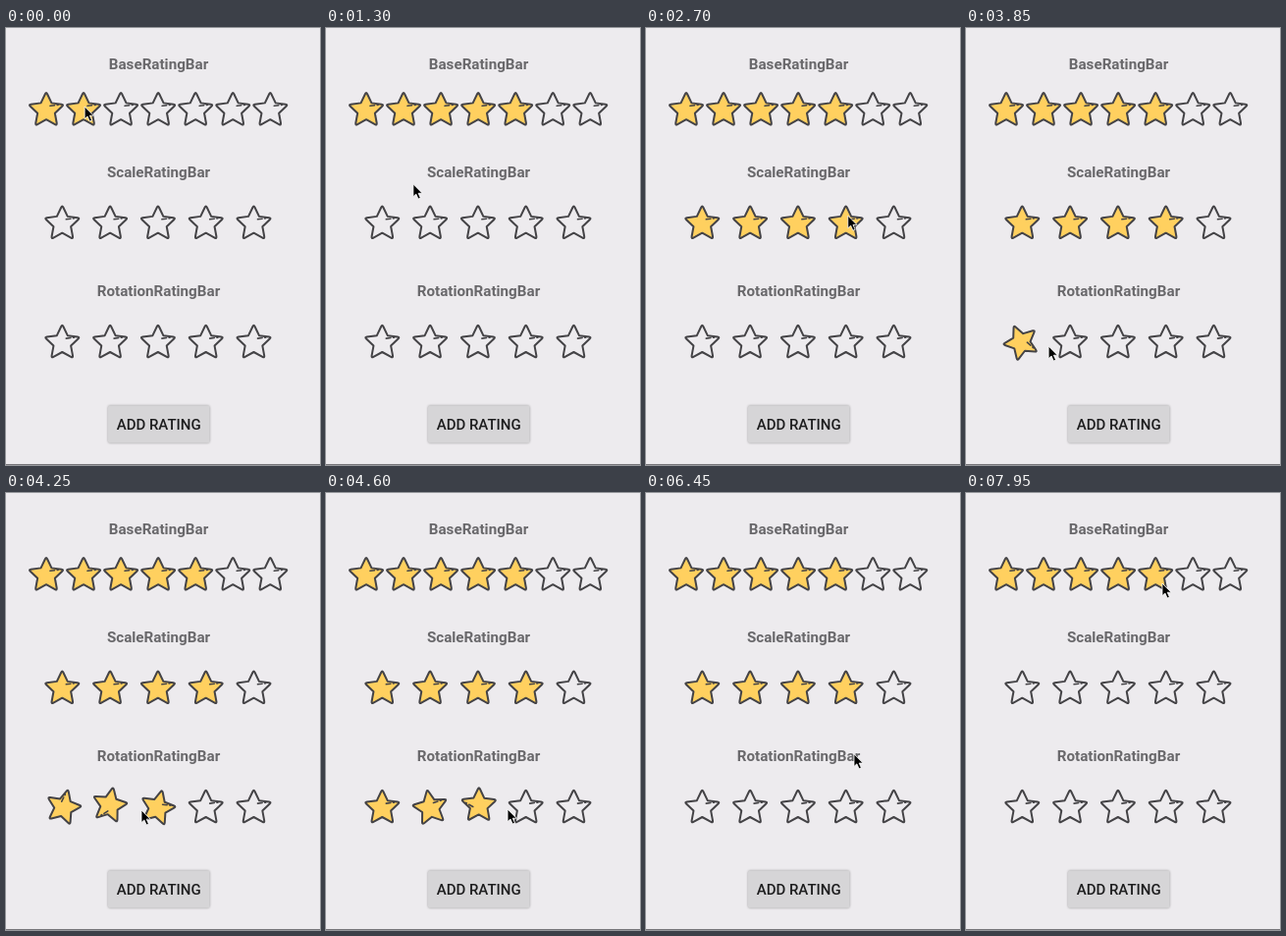
Write an HTML page that moves like this. It is 320 by 445 pixels and loops after 8000 ms.

```html
<!DOCTYPE html>
<html lang="en">
<head>
<meta charset="utf-8">
<title>Rating bars</title>
<style>
html, body { margin: 0; width: 100%; height: 100%; overflow: hidden; background: #edebee; }
svg { display: block; width: 320px; height: 445px; }
text { font-family: Roboto, Arial, sans-serif; text-anchor: middle; }
.title { font-size: 15.2px; font-weight: 700; fill: #69686b; }
.label { font-size: 15px; font-weight: 500; fill: #1d1d1e; }
.button { fill: #d6d5d7; filter: drop-shadow(0 .6px .8px rgba(0, 0, 0, .35)); }
.star { stroke: #444346; stroke-width: 2; stroke-linejoin: round; stroke-linecap: round; }
.shine { fill: none; stroke-width: 1.6; }
</style>
</head>
<body>
<svg viewBox="0 0 320 445">
  <text class="title" x="155.5" y="41.5">BaseRatingBar</text>
  <text class="title" x="155.5" y="151.6">ScaleRatingBar</text>
  <text class="title" x="155.5" y="272.6">RotationRatingBar</text>
  <rect class="button" x="104" y="384.5" width="103.5" height="38" rx="2"/>
  <text class="label" x="155.7" y="409">ADD RATING</text>
  <rect y="444" width="320" height="1" fill="#77767a"/>
  <g id="stars"></g>
  <path id="cursor" d="M0 0V12.6L2.9 10L5.1 15L7.4 14L5.2 9.2H9.2Z"
        fill="#000" stroke="#fff" stroke-width=".8" stroke-linejoin="round"/>
</svg>
<script>
const LOOP = 8000;
const EMPTY = '#edebee', GOLD = '#ffd05f';

// lights: when each star fills; clear: when the whole row empties
const rows = [
  { x: 41, y: 82.5, gap: 38.05, count: 7, lights: [0, 0, 180, 400, 620] },
  { x: 57.3, y: 198, gap: 48.8, count: 5, lights: [1650, 1850, 2050, 2250], clear: 7000, pose: pop },
  { x: 57.3, y: 319.3, gap: 48.8, count: 5, lights: [3660, 3886, 4149, 4620], clear: 6100, pose: spin }
];

// time, x, y of the pointer tip at its turning points
const route = [
  [0, 80, 80], [800, 199, 85], [1300, 89, 159], [1650, 54, 196],
  [2400, 205, 191], [2700, 206, 191], [3400, 54, 327], [3660, 58, 326],
  [3850, 84, 324], [4600, 185, 322], [5500, 246, 326], [6100, 206, 320],
  [6450, 212, 266], [6900, 209, 198], [7500, 200, 92], [LOOP, 200, 92]
];

const ease = p => (1 - Math.cos(Math.PI * p)) / 2;
const mix = (a, b, p) => a + (b - a) * p;

function pop(age) {
  const p = Math.max(0, 1 - Math.abs(age / 200 - 1));
  return `scale(${1 + 0.2 * ease(p)})`;
}

function spin(age) {
  return `rotate(${360 * ease(Math.min(age / 800, 1))})`;
}

// Five-pointed star whose tips are rounded by a curve
function starPath(outer, inner) {
  const at = (r, step) => {
    const angle = (step * 36 - 90) * Math.PI / 180;
    return [r * Math.cos(angle), r * Math.sin(angle)];
  };
  const toward = (a, b, p) => a.map((v, i) => mix(v, b[i], p));
  let d = '';
  for (let step = 0; step < 10; step += 2) {
    const tip = at(outer, step);
    const before = at(inner, step - 1), after = at(inner, step + 1);
    d += `${d ? 'L' : 'M'}${toward(tip, before, 0.2)}Q${tip} ${toward(tip, after, 0.2)}L${after}`;
  }
  return d + 'Z';
}

function add(parent, name, attrs) {
  const node = document.createElementNS('http://www.w3.org/2000/svg', name);
  for (const key in attrs) node.setAttribute(key, attrs[key]);
  return parent.appendChild(node);
}

const layer = document.getElementById('stars');
const cursor = document.getElementById('cursor');
const outline = starPath(19, 9.3);

for (const row of rows) {
  row.stars = Array.from({ length: row.count }, (_, i) => {
    const place = add(layer, 'g', { transform: `translate(${row.x + i * row.gap} ${row.y})` });
    const star = add(place, 'g', { class: 'star' });
    const body = add(star, 'path', { d: outline, transform: 'translate(0 1.4)' });
    add(star, 'path', { class: 'shine', d: 'M4 -3.2L8.6 -3.8M11.2 -4.1L12.2 -4.2' });
    return { star, body };
  });
}

function pointerAt(t) {
  const next = route.findIndex(([time]) => time > t);
  const [t0, x0, y0] = route[next - 1], [t1, x1, y1] = route[next];
  const p = (t - t0) / (t1 - t0);
  return [mix(x0, x1, p), mix(y0, y1, p)];
}

function draw(t) {
  for (const { stars, lights, clear = LOOP, pose } of rows) {
    stars.forEach(({ star, body }, i) => {
      const lit = t >= lights[i] && t < clear;
      body.setAttribute('fill', lit ? GOLD : EMPTY);
      star.setAttribute('transform', lit && pose ? pose(t - lights[i]) : '');
    });
  }
  cursor.setAttribute('transform', `translate(${pointerAt(t)})`);
}

const start = performance.now();
function tick() {
  draw(Math.max(0, performance.now() - start) % LOOP);
  requestAnimationFrame(tick);
}
tick();
</script>
</body>
</html>
```
